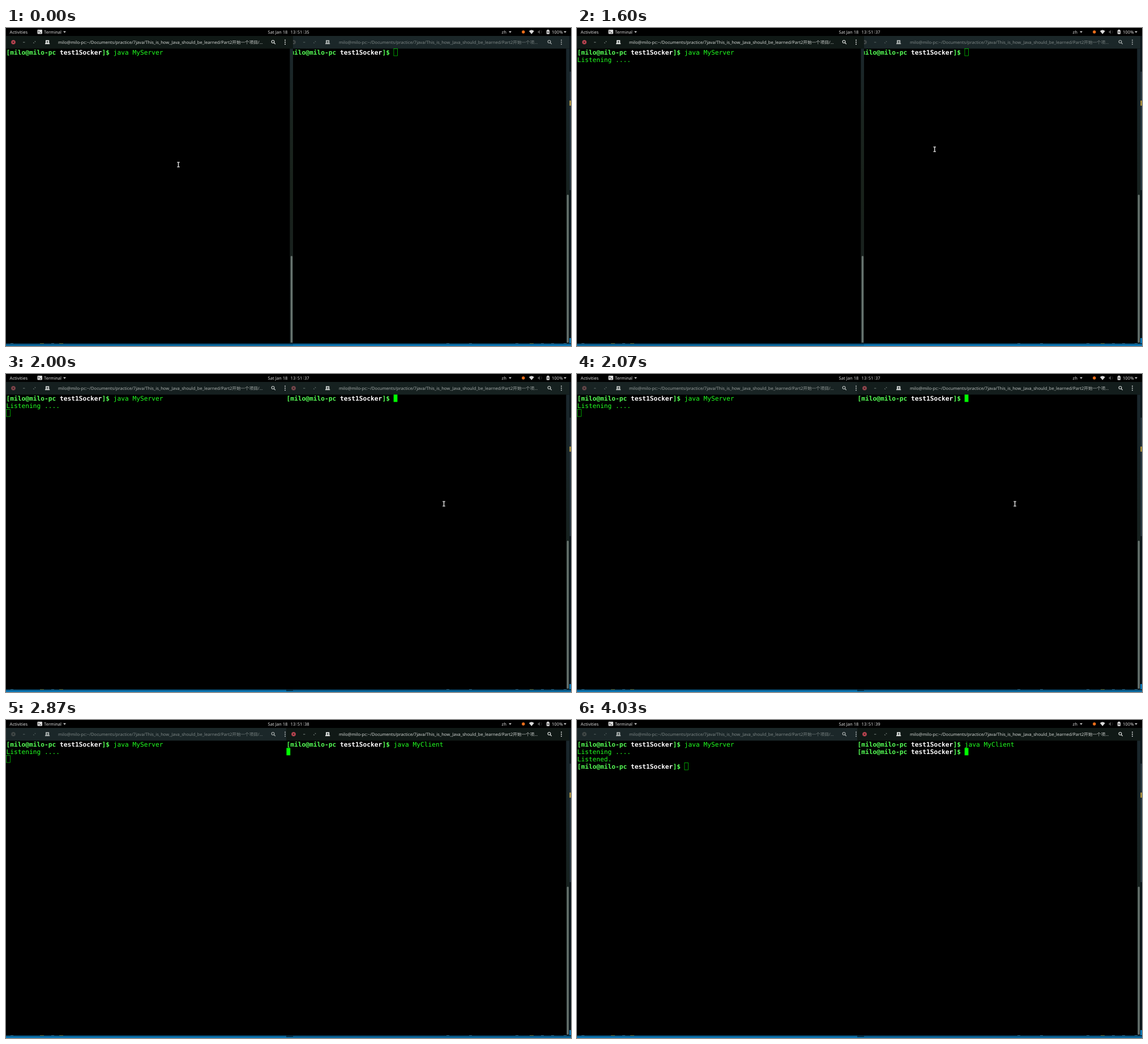
These frames come from a looping animation (998 px wide and 561 px high, 4.63 s). An HTML page with a canvas:

```html
<!DOCTYPE html>
<html lang="en">
<head>
<meta charset="utf-8">
<title>Two terminals</title>
<style>
html, body { margin: 0; width: 100%; height: 100%; overflow: hidden; background: #000; }
canvas { display: block; width: 998px; height: 561px; }
</style>
</head>
<body>
<canvas id="stage" width="998" height="561"></canvas>
<script>
const ctx = document.getElementById('stage').getContext('2d');
const LOOP = 4630, STEP = 1000 / 30;
const CELL = 6.757, ROW = 13, TOP = 36.3, PAD = 0.45;
const MONO = '11.2px "DejaVu Sans Mono", monospace';
const UI = '7.6px "Noto Sans", "Noto Sans CJK SC", "Noto Sans CJK", sans-serif';
const GREEN = '#0f0', OUTPUT = '#20ff20', PROMPT = '#5f5', WHITE = '#fff';
const PATH = 'milo@milo-pc:~/Documents/practice/7java/This_is_how_Java_should_be_learned/Part2开始一个项';

const clamp = v => Math.max(0, Math.min(1, v));
const mix = (a, b, k) => `rgb(${a.map((v, i) => Math.round(v + (b[i] - v) * k))})`;

function rect(x, y, w, h, color) {
  ctx.fillStyle = color;
  ctx.fillRect(x, y, w, h);
}

function disc(x, y, r, color) {
  ctx.fillStyle = color;
  ctx.beginPath();
  ctx.arc(x, y, r, 0, Math.PI * 2);
  ctx.fill();
}

function pill(x, y, w, h, r, color) {
  ctx.fillStyle = color;
  ctx.beginPath();
  ctx.roundRect(x, y, w, h, r);
  ctx.fill();
}

function poly(points, color) {
  ctx.fillStyle = color;
  ctx.beginPath();
  points.forEach(p => ctx.lineTo(...p));
  ctx.fill();
}

function line(x1, y1, x2, y2, color, width = 1) {
  ctx.strokeStyle = color;
  ctx.lineWidth = width;
  ctx.beginPath();
  ctx.moveTo(x1, y1);
  ctx.lineTo(x2, y2);
  ctx.stroke();
}

function label(text, x, y, color) {
  ctx.font = UI;
  ctx.fillStyle = color;
  ctx.fillText(text, x, y);
}

function fade(x, y, w, h, colors) {
  const g = ctx.createLinearGradient(0, y, 0, y + h);
  colors.forEach((c, i) => g.addColorStop(i / (colors.length - 1), c));
  rect(x, y, w, h, g);
}

// Terminal text sits on a fixed cell grid.
function cells(text, x, row, col, color, bold) {
  ctx.font = (bold ? 'bold ' : '') + MONO;
  ctx.fillStyle = color;
  [...text].forEach((c, i) => ctx.fillText(c, x + PAD + (col + i) * CELL, TOP + row * ROW + 10.4));
}

function prompt(x, row, command = '') {
  cells('[milo@milo-pc', x, row, 0, PROMPT, true);
  cells('test1Socker', x, row, 14, WHITE, true);
  cells(']$', x, row, 25, PROMPT, true);
  cells(command, x, row, 28, OUTPUT);
}

function cursor(x, row, col, focused, lit) {
  const cx = x + PAD + col * CELL, cy = TOP + row * ROW;
  if (!focused) {
    ctx.strokeStyle = GREEN;
    ctx.lineWidth = 0.6;
    ctx.strokeRect(cx + 0.3, cy + 0.3, CELL - 0.2, ROW - 0.6);
  } else if (lit) {
    rect(cx, cy, CELL, ROW, GREEN);
  }
}

function titleBar(x, w, title, titleX, focus) {
  const end = x + w;
  const back = mix([27, 39, 41], [16, 25, 22], focus);
  const text = mix([125, 134, 133], [208, 212, 209], focus);
  const icon = mix([178, 184, 183], [232, 235, 233], focus);
  const dim = mix([92, 104, 103], [134, 146, 140], focus);
  rect(x, 14, w, 22.4, back);

  disc(x + 13, 25, 3.8, mix([66, 73, 72], [188, 70, 82], focus));
  const cross = mix([24, 34, 35], [40, 20, 24], focus);
  line(x + 11.6, 23.6, x + 14.4, 26.4, cross, 0.9);
  line(x + 14.4, 23.6, x + 11.6, 26.4, cross, 0.9);
  line(x + 30, 25.2, x + 33.4, 25.2, dim, 0.9);
  poly([[x + 50.2, 23.3], [x + 52.2, 23.3], [x + 52.2, 25.3]], dim);
  poly([[x + 48.3, 24.9], [x + 50.3, 26.9], [x + 48.3, 26.9]], dim);

  rect(x + 70, 21.5, 6.2, 5.4, icon);
  rect(x + 69, 26.7, 8.2, 1.7, icon);
  line(x + 73.1, 22.8, x + 73.1, 26.4, back, 0.9);
  line(x + 71.3, 24.6, x + 74.9, 24.6, back, 0.9);

  label(title, titleX, 27.7, text);

  ctx.strokeStyle = icon;
  ctx.lineWidth = 1.1;
  ctx.beginPath();
  ctx.arc(end - 35.5, 24.1, 2.4, 0, Math.PI * 2);
  ctx.stroke();
  line(end - 33.8, 25.9, end - 31.2, 28.4, icon, 1.3);
  for (const dy of [-3.5, 0, 3.5]) disc(end - 14, 25 + dy, 1, icon);
}

function leftWindow(t, focus) {
  rect(0, 36, 507, 520, '#000');
  titleBar(0, 507, PATH + '目/…', 92, focus);
  fade(501.4, 36.4, 5.6, 519.6, ['#1b272c', '#1a241f', '#19221b', '#19211f', '#1a2426']);
  pill(502.8, 402, 3.2, 153, 1.6, '#68746f');

  prompt(0, 0, 'java MyServer');
  if (t >= 770) cells('Listening ....', 0, 1, 0, OUTPUT);
  const focused = t < 1900;
  if (t < 670) cursor(0, 0, 41, true, t >= 270);
  else if (t < 770) cursor(0, 1, 0, true, true);
  else if (t < 2970) cursor(0, 2, 0, focused, t < 1370);
  else {
    cells('Listened.', 0, 2, 0, OUTPUT);
    prompt(0, 3);
    cursor(0, 3, 28, false);
  }
}

function rightWindow(t, focus) {
  const x = 495;
  rect(x, 36, 500, 520, '#000');
  titleBar(x, 500, PATH + '…', 588, focus);
  fade(989.4, 36.4, 5.6, 519.6, ['#1a272d', '#17221f', '#141c1f']);
  pill(990.7, 294, 3.2, 261, 1.6, '#68746f');

  prompt(x, 0, t >= 2500 ? 'java MyClient' : '');
  if (t < 2500) cursor(x, 0, 28, t >= 1900, true);
  else if (t < 2870) cursor(x, 0, 41, true, true);
  else if (t < 2970) cursor(x, 1, 0, true, true);
  else {
    prompt(x, 1);
    cursor(x, 1, 28, true, t < 3470 || t >= 3730);
  }
}

// Sliver of the editor showing around the terminals.
function backdrop(swapped) {
  rect(0, 0, 998, 561, '#000');
  rect(995, 14, 3, 533, '#0b151a');
  rect(995.4, 77, 2.6, 209, '#26343d');
  rect(995.2, 128, 2.8, 9, '#a58c3c');
  rect(995, 547, 3, 14, '#0c76b2');
  const lit = ['#031c2a', '#0a6ca4', '#0c7fc2'], shaded = ['#02141f', '#095f90', '#0b72ad'];
  const split = swapped ? 495 : 507;
  fade(0, 556, split, 5, swapped ? lit : shaded);
  fade(split, 556, 998 - split, 5, swapped ? shaded : lit);
  if (swapped) rect(495, 556, 12, 3, '#04283c');
  for (const x of [8, 80, 778, 818, 900, 945, 963, 985]) rect(x, 556, 5, 1, '#2a6484');
  for (const x of [60, 94, 925]) rect(x, 556, 7, 1, '#5a6a38');
}

function caret(x) {
  poly([[x, 5.8], [x + 5, 5.8], [x + 2.5, 8.6]], '#d6d6d6');
}

function topBar(seconds) {
  const ink = '#dadada';
  rect(0, 0, 998, 14, '#000');
  label('Activities', 6.6, 9.8, ink);
  pill(55.5, 3, 8.5, 7.6, 1, ink);
  line(57, 4.8, 58.8, 6.3, '#000', 0.8);
  line(58.8, 6.3, 57, 7.8, '#000', 0.8);
  line(59.6, 8.3, 62, 8.3, '#000', 0.8);
  label('Terminal', 67, 9.8, ink);
  caret(101);

  label('Sat Jan 18', 462.6, 9.8, ink);
  ['13', '51', String(seconds)].forEach((part, i) => {
    const x = 502.6 + i * 12.15;
    label(part, x, 9.8, ink);
    if (i < 2) label(':', x + 9.4, 9.3, ink);
  });

  label('zh', 875.6, 9.8, ink);
  caret(888);
  disc(913.8, 7, 2.7, '#f0701c');
  ctx.fillStyle = ink;
  ctx.beginPath();
  ctx.moveTo(928.3, 10.8);
  ctx.arc(928.3, 10.8, 7, -Math.PI * 0.72, -Math.PI * 0.28);
  ctx.fill();
  poly([[939.5, 5.6], [941, 5.6], [943, 3.6], [943, 10.4], [941, 8.4], [939.5, 8.4]], '#555');
  ctx.strokeStyle = '#333';
  ctx.lineWidth = 0.9;
  ctx.beginPath();
  ctx.arc(942.5, 7, 3.6, -0.9, 0.9);
  ctx.stroke();
  rect(956.2, 2.8, 2.4, 1.2, ink);
  pill(954.8, 3.8, 5.2, 7, 0.8, ink);
  poly([[957.9, 5], [956, 7.6], [957.3, 7.6], [956.9, 9.6], [958.9, 6.9], [957.6, 6.9]], '#000');
  label('100', 964, 9.8, ink);
  label('%', 977.2, 9.8, ink);
  caret(985);
}

function pointer(t) {
  if (t >= 670 && t < 1300 || t >= 2500) return;
  const u = clamp((t - 1304) / 430);
  const x = 304.5 + 469 * u, y = 241 - 100.6 * u + 88.6 * u * u;
  for (const [color, width] of [['#222', 2.6], ['#e6e6e6', 1.2]]) {
    line(x, y - 4, x, y + 4, color, width);
    line(x - 2.2, y - 4, x + 2.2, y - 4, color, width);
    line(x - 2.2, y + 4, x + 2.2, y + 4, color, width);
  }
}

function draw(t) {
  const swapped = t >= 1900;
  const shift = clamp((t - 1870) / 290);
  backdrop(swapped);
  const left = () => leftWindow(t, 1 - shift);
  const right = () => rightWindow(t, shift);
  (swapped ? [left, right] : [right, left]).forEach(paint => paint());
  topBar(35 + Math.floor((t + 630) / 1000));
  pointer(t);
}

ctx.textRendering = 'geometricPrecision';
const start = performance.now();

function tick() {
  const t = (performance.now() - start) % LOOP;
  // The screen refreshes thirty times a second; the offset absorbs rounding.
  draw(Math.floor((t + 4) / STEP) * STEP + 4);
  requestAnimationFrame(tick);
}
tick();
</script>
</body>
</html>
```
